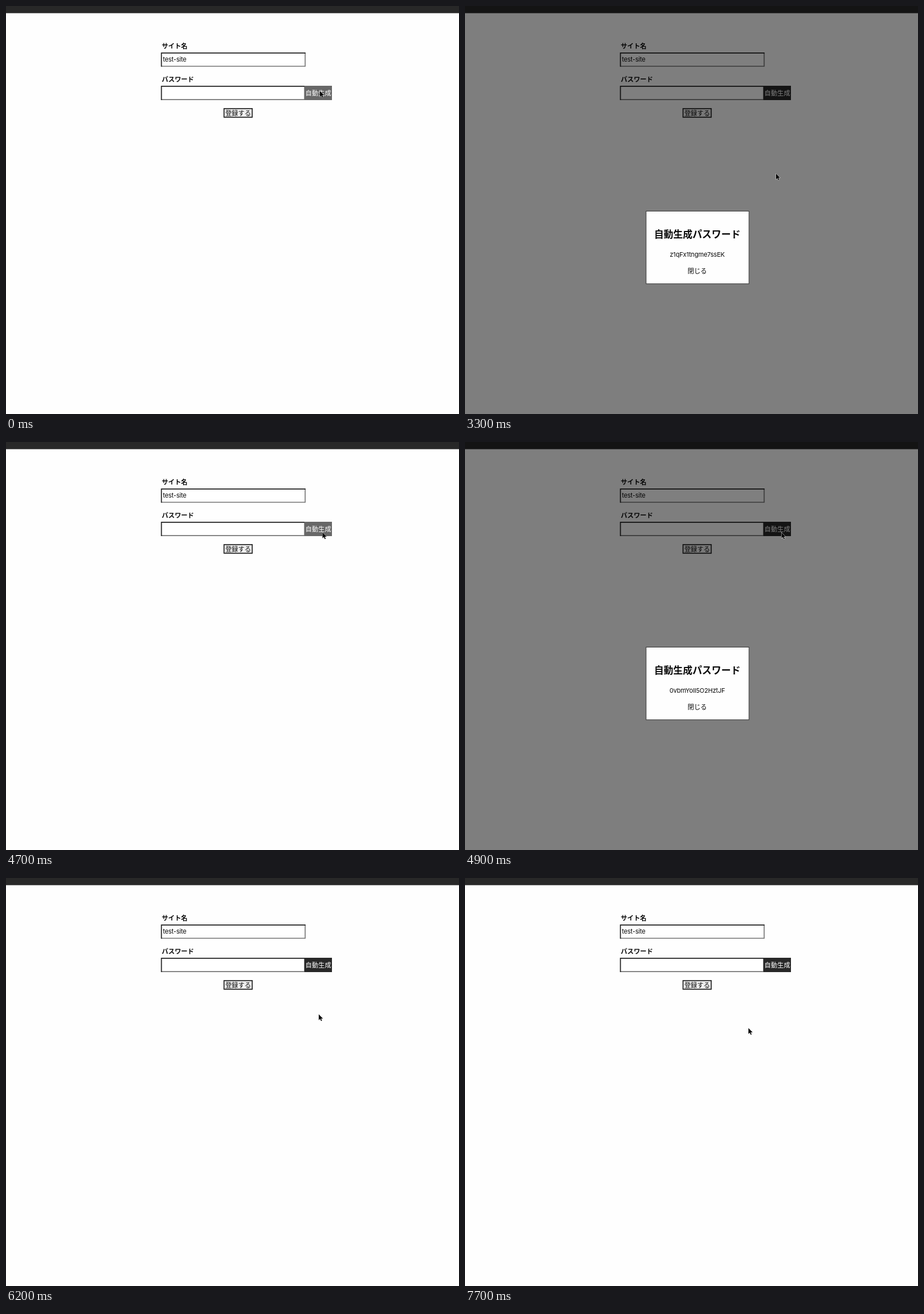
An HTML page that plays this animation: 788x711 px, repeating every 7.8 s.

```html
<!DOCTYPE html>
<html lang="ja">
<head>
<meta charset="utf-8">
<style>
  html, body { margin: 0; width: 100%; height: 100%; overflow: hidden; background: #fefefe; }
  svg { display: block; }
  text { font: 11.2px "Noto Sans CJK JP", "Noto Sans CJK", sans-serif; fill: #0a0a0a; }
  .bold { font-weight: 700; }
  .title { font-size: 16.7px; font-weight: 700; }
  .latin { font: 11px Inter, sans-serif; letter-spacing: -.2px; }
  .mid { text-anchor: middle; }
  .box { fill: #fff; }
  .lit { fill: none; stroke: #767676; stroke-width: 1.7; }
  .dark { fill: none; stroke: #202020; stroke-width: 1.7; }
</style>
</head>
<body>
<svg width="788" height="711" viewBox="0 0 788 711">
  <rect width="788" height="711" fill="#fefefe"/>
  <rect width="788" height="12.5" fill="#282828"/>

  <text class="bold" x="271" y="73.8">サイト名</text>
  <rect class="box" x="270" y="81" width="251" height="24.5"/>
  <path class="lit" d="M270 105H520.4V81"/>
  <path class="dark" d="M270.4 105.8V81.8H521"/>
  <text class="latin" x="273" y="97.3">test-site</text>

  <text class="bold" x="271" y="131.8">パスワード</text>
  <rect class="box" x="270" y="139" width="250" height="24.5"/>
  <path class="lit" d="M270 163.2H519.4V139"/>
  <path class="dark" d="M270.4 164V139.9H520"/>

  <rect id="generate" x="519" y="139" width="48" height="25"/>
  <text class="mid" x="543.2" y="155.6" style="fill:#fff">自動生成</text>

  <rect class="dark" x="379.3" y="178.8" width="49" height="15" style="fill:#efefef"/>
  <text class="mid" x="403.8" y="190.6">登録する</text>

  <g id="modal">
    <rect width="788" height="711" fill="#000" opacity=".5"/>
    <rect x="315" y="357.5" width="179" height="126.5" fill="#fefefe" stroke="#333"/>
    <text class="title mid" x="404" y="404.2">自動生成パスワード</text>
    <text class="latin mid" id="password" x="404" y="437.4"></text>
    <text class="mid" x="404" y="465.6">閉じる</text>
  </g>

  <path id="cursor" d="M0 0V10.3L2.4 8.1L4 11.8L5.7 11L4.1 7.4H7.3Z"
        fill="#0a0a0a" stroke="#fff" stroke-width=".9" paint-order="stroke"/>
</svg>
<script>
  const LOOP = 7800, STEP = 100;
  const [generate, modal, password, cursor] =
    ["generate", "modal", "password", "cursor"].map(id => document.getElementById(id));

  // Pointer moves: start ms, end ms, target x, target y
  const START = [546, 148];
  const MOVES = [
    [3100, 3300, 541, 292],
    [3700, 4500, 549, 162],
    [4500, 4700, 550.5, 157.5],
    [5300, 5700, 544, 237.5],
    [6300, 6600, 555, 195],
    [6700, 6800, 555.5, 194],
    [6900, 7700, 493, 261.5],
  ];

  const within = (t, a, b) => t >= a && t < b;
  const ease = u => u * u * (3 - 2 * u);

  function pointerAt(t) {
    let [x, y] = START;
    for (const [from, to, toX, toY] of MOVES) {
      const k = ease(Math.min(1, Math.max(0, (t - from) / (to - from))));
      x += (toX - x) * k;
      y += (toY - y) * k;
    }
    return [x, y];
  }

  function draw(now) {
    const t = Math.floor((now % LOOP) / STEP) * STEP;
    const open = within(t, 2400, 3600) || within(t, 4900, 6200);
    const hover = t < 2400 || within(t, 4600, 4900);
    modal.style.display = open ? "" : "none";
    password.textContent = t < 4000 ? "z1qFx1tngme7ssEK" : "0vbmYolI5O2HztJF";
    generate.setAttribute("fill", hover ? "#686868" : "#282828");
    cursor.setAttribute("transform", `translate(${pointerAt(t)})`);
    cursor.setAttribute("stroke-opacity", open ? 1 : .8);
  }

  const origin = performance.now();
  function tick() {
    draw(performance.now() - origin);
    requestAnimationFrame(tick);
  }
  tick();
</script>
</body>
</html>
```
